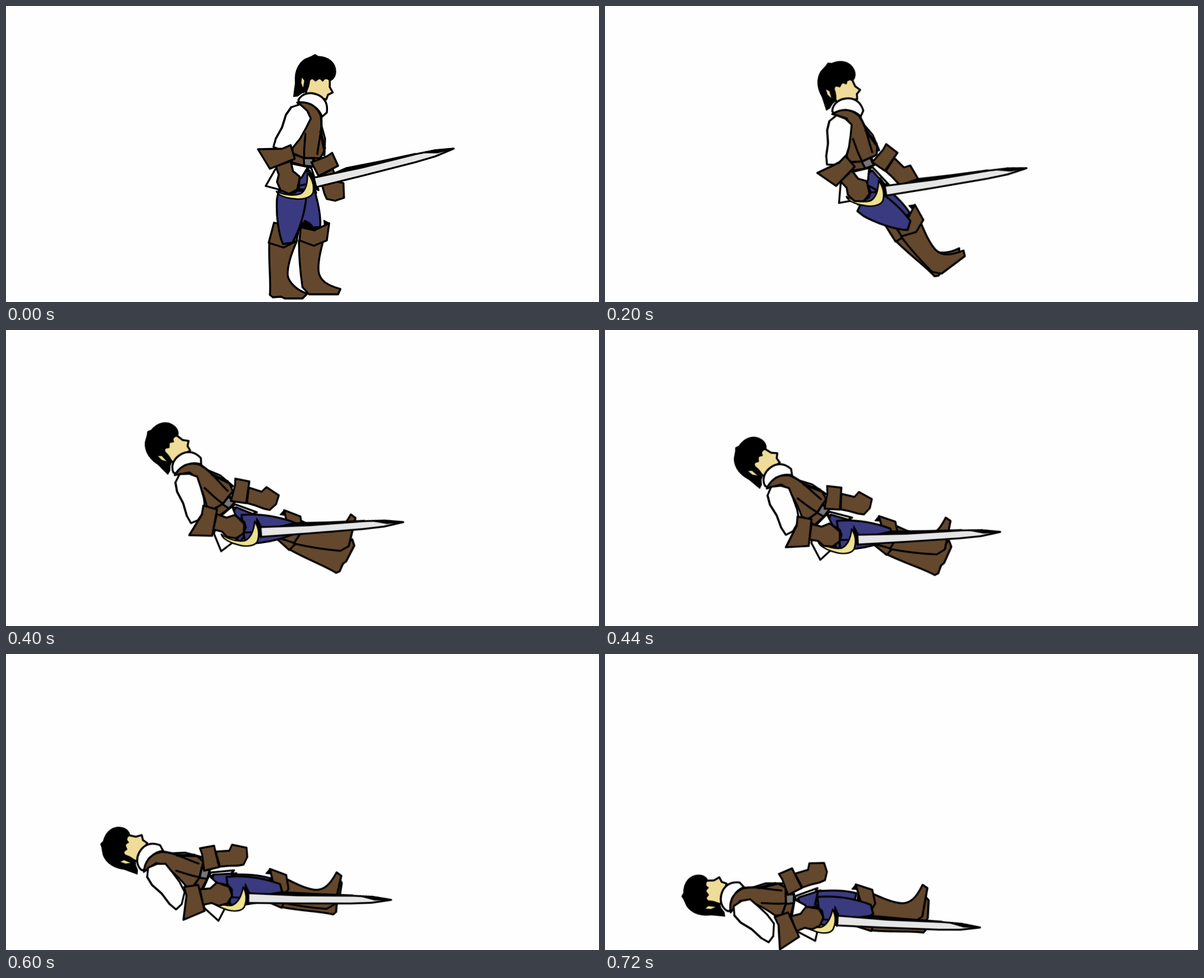
An HTML page for the animation above (1.44 s loop, 1000 by 500 pixels).

```html
<!DOCTYPE html>
<html lang="en">
<head>
<meta charset="utf-8">
<title>Falling swordsman</title>
<style>
html, body { margin: 0; width: 100%; height: 100%; overflow: hidden; background: #fefefe; }
svg { display: block; width: 100vw; height: 100vh; }
path { stroke: #000; stroke-width: 3.3; stroke-linejoin: round; stroke-linecap: round; fill: none; }
.leather { fill: #64482d; }
.cloth { fill: #fefefe; }
.denim { fill: #3a3a80; }
.skin { fill: #efdc98; }
.brass { fill: #efe28e; stroke-width: 2.5; }
.steel { fill: #e6e6e6; }
.grey { fill: #777; }
.ink { fill: #000; stroke-width: 1.5; }

/* each stretch advances in 40 ms steps */
.part { animation: 1440ms steps(3, end) infinite; }
.body { animation-name: body; }
.arm { animation-name: arm; }
.glove { animation-name: glove; }
.far-glove { animation-name: far-glove; }
.sword { animation-name: sword; }
.thigh { animation-name: thigh; }
.boot { animation-name: boot; }
.far-thigh { animation-name: far-thigh; }
.far-boot { animation-name: far-boot; }

@keyframes body {
  0% { transform: translate(510px, 264px) rotate(0deg); animation-timing-function: steps(5, end); }
  13.888% { transform: translate(443px, 266px) rotate(-25deg); }
  22.222% { transform: translate(391px, 265px) rotate(-41deg); }
  30.555% { transform: translate(368px, 306px) rotate(-57.5deg); animation-timing-function: steps(2, end); }
  36.111% { transform: translate(351px, 341px) rotate(-67deg); }
  44.444% { transform: translate(327px, 387px) rotate(-82.5deg); animation-timing-function: steps(2, end); }
  50%, 100% { transform: translate(312px, 414px) rotate(-92deg); }
}
@keyframes arm {
  0% { transform: translate(493px, 175px) rotate(0deg); animation-timing-function: steps(5, end); }
  13.888% { transform: translate(391px, 194px) rotate(-21deg); }
  22.222% { transform: translate(321px, 210px) rotate(-37deg); }
  30.555% { transform: translate(285px, 273px) rotate(-49deg); animation-timing-function: steps(2, end); }
  36.111% { transform: translate(264px, 320px) rotate(-57deg); }
  44.444% { transform: translate(238px, 391px) rotate(-70deg); animation-timing-function: steps(2, end); }
  50%, 100% { transform: translate(225px, 431px) rotate(-76deg); }
}
@keyframes glove {
  0% { transform: translate(425px, 242px) rotate(0deg); animation-timing-function: steps(5, end); }
  13.888% { transform: translate(358px, 282px) rotate(-24deg); }
  22.222% { transform: translate(317px, 306px) rotate(-48deg); }
  30.555% { transform: translate(305px, 367px) rotate(-62deg); animation-timing-function: steps(2, end); }
  36.111% { transform: translate(302px, 411px) rotate(-73deg); }
  44.444% { transform: translate(298px, 468px) rotate(-86deg); animation-timing-function: steps(2, end); }
  50%, 100% { transform: translate(295px, 499px) rotate(-92deg); }
}
@keyframes far-glove {
  0% { transform: translate(537px, 268px) rotate(0deg); animation-timing-function: steps(5, end); }
  13.888% { transform: translate(472px, 257px) rotate(-28deg); }
  22.222% { transform: translate(416px, 250px) rotate(-45deg); }
  30.555% { transform: translate(385px, 285px) rotate(-59deg); animation-timing-function: steps(2, end); }
  36.111% { transform: translate(364px, 317px) rotate(-68deg); }
  44.444% { transform: translate(333px, 360px) rotate(-80deg); animation-timing-function: steps(2, end); }
  50%, 100% { transform: translate(313px, 385px) rotate(-89deg); }
}
@keyframes sword {
  0% { transform: translate(520px, 298px) rotate(0deg); animation-timing-function: steps(5, end); }
  13.888% { transform: translate(472px, 312px) rotate(4.6deg); }
  22.222% { transform: translate(436px, 315px) rotate(8deg); }
  30.555% { transform: translate(425px, 354px) rotate(10.6deg); animation-timing-function: steps(2, end); }
  36.111% { transform: translate(417px, 384px) rotate(12.7deg); }
  44.444% { transform: translate(403px, 426px) rotate(15.3deg); animation-timing-function: steps(2, end); }
  50%, 100% { transform: translate(391px, 450px) rotate(16.5deg); }
}
@keyframes thigh {
  0% { transform: translate(482px, 322px) rotate(0deg); animation-timing-function: steps(5, end); }
  13.888% { transform: translate(444px, 331px) rotate(-65deg); }
  22.222% { transform: translate(422px, 316px) rotate(-97deg); }
  30.555% { transform: translate(404px, 346px) rotate(-97deg); animation-timing-function: steps(2, end); }
  36.111% { transform: translate(395px, 372px) rotate(-95deg); }
  44.444% { transform: translate(380px, 414px) rotate(-99deg); animation-timing-function: steps(2, end); }
  50%, 100% { transform: translate(371px, 434px) rotate(-97deg); }
}
@keyframes boot {
  0% { transform: translate(443px, 400px) rotate(0deg); animation-timing-function: steps(5, end); }
  13.888% { transform: translate(490px, 398px) rotate(-47deg); }
  22.222% { transform: translate(483px, 355px) rotate(-56deg); }
  30.555% { transform: translate(475px, 380px) rotate(-66deg); animation-timing-function: steps(2, end); }
  36.111% { transform: translate(470px, 396px) rotate(-70deg); }
  44.444% { transform: translate(462px, 445px) rotate(-87deg); animation-timing-function: steps(2, end); }
  50%, 100% { transform: translate(449px, 468px) rotate(-87deg); }
}
@keyframes far-thigh {
  0% { transform: translate(515px, 318px) rotate(0deg); animation-timing-function: steps(5, end); }
  13.888% { transform: translate(470px, 313px) rotate(-35deg); }
  22.222% { transform: translate(430px, 302px) rotate(-75deg); }
  30.555% { transform: translate(416px, 331px) rotate(-72deg); animation-timing-function: steps(2, end); }
  36.111% { transform: translate(402px, 358px) rotate(-74deg); }
  44.444% { transform: translate(381px, 390px) rotate(-76deg); animation-timing-function: steps(2, end); }
  50%, 100% { transform: translate(366px, 407px) rotate(-78deg); }
}
@keyframes far-boot {
  0% { transform: translate(540px, 366px) rotate(0deg); animation-timing-function: steps(5, end); }
  13.888% { transform: translate(518px, 338px) rotate(-37deg); }
  22.222% { transform: translate(481px, 289px) rotate(-72deg); }
  30.555% { transform: translate(460px, 319px) rotate(-79deg); animation-timing-function: steps(2, end); }
  36.111% { transform: translate(455px, 347px) rotate(-78deg); }
  44.444% { transform: translate(437px, 378px) rotate(-77deg); animation-timing-function: steps(2, end); }
  50%, 100% { transform: translate(421px, 394px) rotate(-80deg); }
}
</style>
</head>
<body>
<!-- Every part is drawn in its standing place; the inner shift puts its pivot at 0,0. -->
<svg viewBox="0 0 1000 500">
  <g class="part body"><g transform="translate(-510 -264)">
    <path class="cloth" d="M508 272L515 274L527 311L520 307Z"/>
    <path class="denim" d="M496 280L512 278L523 316L466 320Z"/>
  </g></g>

  <g class="part boot"><g transform="translate(-443 -400)">
    <path class="leather" d="M444 401C443 440 447 465 445 488L450 492L464 491L470 494L500 494L508 486C490 480 477 467 475 455C474 436 483 414 490 398Z"/>
    <path class="leather" d="M452 366L443 400L468 408L490 397L494 376Z"/>
  </g></g>

  <g class="part far-thigh"><g transform="translate(-515 -318)">
    <path class="denim" d="M496 310L520 310C526 332 531 352 530 374L498 374C500 350 498 330 496 310Z"/>
  </g></g>

  <g class="part far-boot"><g transform="translate(-540 -366)">
    <path class="leather" d="M494 396C494 430 497 455 500 475L511 487L560 487L564 478C542 472 529 464 527 448C526 432 530 416 534 400Z"/>
    <path class="leather" d="M497 374L520 379L545 367L541 396L519 405L495 396Z"/>
    <path class="ink" d="M496 374L504 362L513 367L519 374L537 372L536 362L545 367L520 379Z"/>
  </g></g>

  <g class="part thigh"><g transform="translate(-482 -322)">
    <path class="denim" d="M460 312L507 312C506 342 499 366 488 390L483 400L467 402C460 386 455 355 457 325Z"/>
  </g></g>

  <g class="part body"><g transform="translate(-510 -264)">
    <path class="cloth" d="M480 266L509 272L499 289L472 313L438 304L454 276Z"/>
    <path class="cloth" d="M530 195L538 224L537 252L526 250Z"/>
    <path class="leather" d="M491 163C510 158 526 170 532 189L532 215L538 240L536 246L530 257L484 258L483 238C496 222 512 195 510 180Z"/>
    <path d="M531 189C534 206 528 225 525 250M505 216C504 230 502 242 503 256M530 212L536 242M484 249L503 257" stroke-width="4"/>
    <path class="leather" d="M484 250L503 257L520 257L519 271L503 270L482 264Z"/>
    <path class="grey" d="M502 257L518 257L518 271L503 270Z"/>

    <path class="skin" d="M510 122L546 122L546 137L551 146L543 150L540 158L524 153L506 147Z"/>
    <path class="cloth" d="M493 159C499 147 514 144 528 151C539 157 543 166 541 180L533 187C528 173 513 161 495 163Z"/>
    <path class="ink" d="M485 153L488 130C486 108 495 92 511 87L516 85L521 82L526 85C545 86 556 96 556 111C556 120 550 126 546 126L539 121L534 127L529 122L522 127L516 122L512 126C511 137 508 147 499 147L492 152Z"/>
    <path class="skin" stroke="none" style="stroke: none" d="M499 121L498 130L501 138L503 126Z"/>
  </g></g>

  <g class="part arm"><g transform="translate(-493 -175)">
    <path class="cloth" d="M496 166L481 171L472 184L465 206L455 224L451 238L463 243L484 239L496 224L506 206L514 190L508 177Z"/>
    <path d="M481 171L472 184L466 204L455 224" stroke-width="4"/>
  </g></g>

  <g class="part far-glove"><g transform="translate(-537 -268)">
    <path class="leather" d="M528 288L551 275L558 297L569 299L570 324L555 329L541 326L537 317L533 302Z"/>
    <path class="leather" d="M515 264L541 254L550 248L560 270L527 287Z"/>
  </g></g>

  <g class="part sword"><g transform="translate(-520 -298)">
    <path d="M474 308L520 298" stroke-width="7"/>
    <path class="ink" d="M510 276L522 290L523 308L515 302Z"/>
    <path class="ink" d="M546 285L574 273L630 262L690 249L640 270Z"/>
    <path class="steel" d="M519 290L600 273L692 250L722 244L755 241L724 254L690 264L600 287L523 306Z"/>
    <path class="ink" d="M700 248L725 243L755 241L728 248Z"/>
    <path class="brass" d="M456 313C470 320 487 321 497 317C506 311 509 298 508 282C516 291 520 303 518 315C514 325 498 328 480 325C468 323 459 319 456 313Z"/>
  </g></g>

  <g class="part glove"><g transform="translate(-425 -242)">
    <path class="leather" d="M455 271L480 262L484 279L495 288L494 308L488 315L476 317L463 311L457 297L460 285Z"/>
    <path d="M494 296L491 310L480 316" stroke-width="4"/>
    <path class="leather" d="M425 242L466 241L480 235L487 258L445 275Z"/>
  </g></g>
</svg>
</body>
</html>
```
